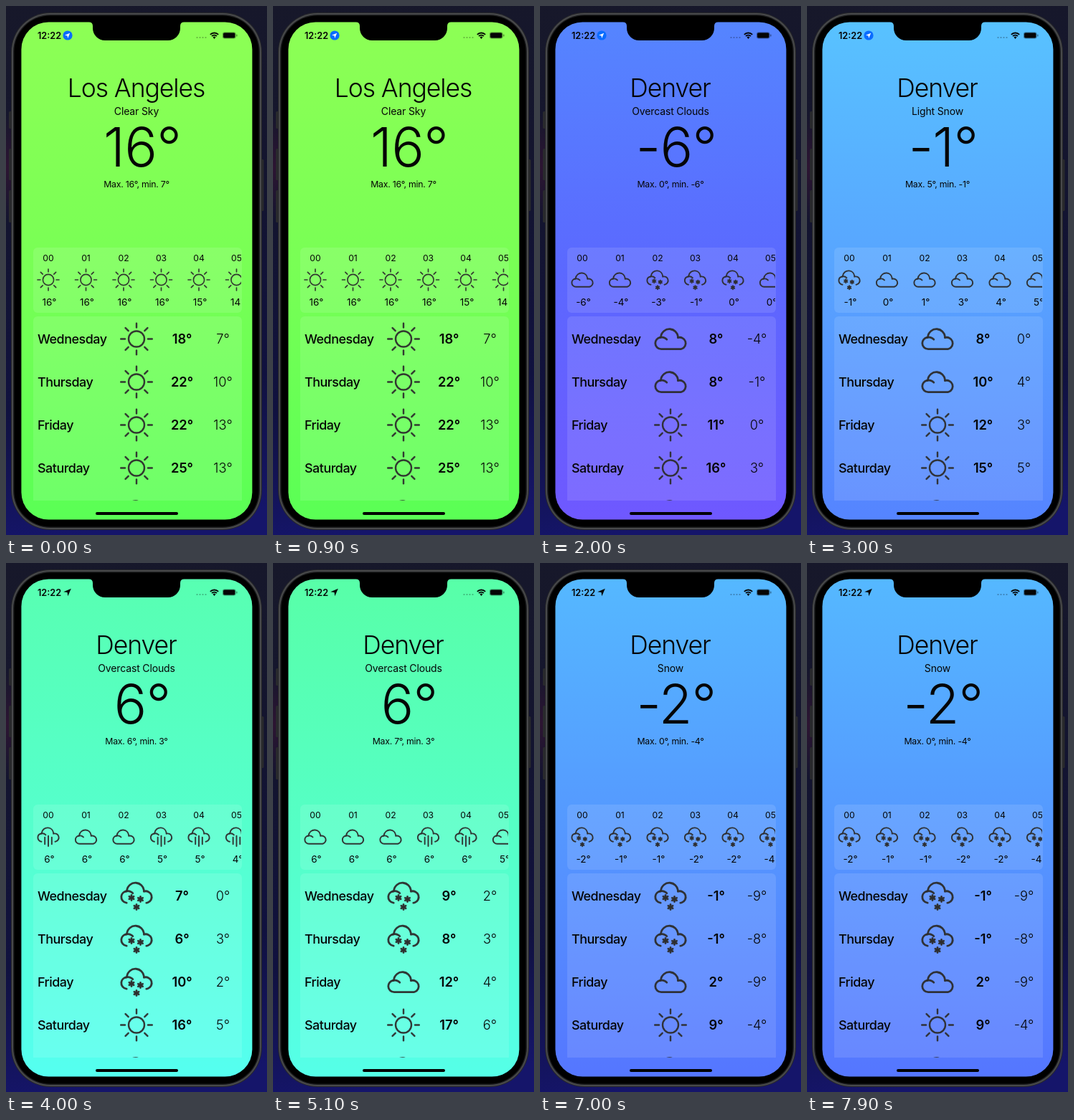
An HTML page with a canvas for the animation above (8000 ms loop, 364x738 px).

```html
<!DOCTYPE html>
<html lang="en">
<head>
<meta charset="utf-8">
<title>Weather</title>
<style>
html, body { margin: 0; width: 100%; height: 100%; overflow: hidden; background: #0d0e20; }
canvas { display: block; width: 364px; height: 738px; }
</style>
</head>
<body>
<canvas id="stage"></canvas>
<script>
const W = 364, H = 738, LOOP = 8000;
const INK = '#050505', ICON = 'rgba(45,45,45,0.95)', CARD = 'rgba(255,255,255,0.11)';
const canvas = document.getElementById('stage');
const ratio = window.devicePixelRatio || 1;
canvas.width = W * ratio;
canvas.height = H * ratio;
const ctx = canvas.getContext('2d');

// Icon letters: s sun, c cloud, r rain, n snow. Days: icon, high, low.
const scenes = [
  { at: 0, city: 'Los Angeles', sky: 'Clear Sky', temp: 16, max: 16, min: 7,
    colors: ['#8dff55', '#78ff55', '#5aff55'], icons: 'ssssss', hours: [16, 16, 16, 16, 15, 14],
    days: [['s', 18, 7], ['s', 22, 10], ['s', 22, 13], ['s', 25, 13]] },
  { at: 1000, city: 'Los Angeles', sky: 'Clear Sky', temp: 12, max: 12, min: 1,
    colors: ['#55ff58', '#55ff75', '#55ff92'], icons: 'ssssss', hours: [12, 11, 11, 10, 9, 8],
    days: [['c', 11, 3], ['s', 14, 6], ['s', 16, 6], ['s', 18, 9]] },
  { at: 2000, city: 'Denver', sky: 'Overcast Clouds', temp: -6, max: 0, min: -6,
    colors: ['#5585ff', '#5b68ff', '#6f58ff'], icons: 'ccnnnc', hours: [-6, -4, -3, -1, 0, 0],
    days: [['c', 8, -4], ['c', 8, -1], ['s', 11, 0], ['s', 16, 3]] },
  { at: 3000, city: 'Denver', sky: 'Light Snow', temp: -1, max: 5, min: -1,
    colors: ['#58c2ff', '#58a4ff', '#5584ff'], icons: 'nccccc', hours: [-1, 0, 1, 3, 4, 5],
    days: [['c', 8, 0], ['c', 10, 4], ['s', 12, 3], ['s', 15, 5]] },
  { at: 4000, city: 'Denver', sky: 'Overcast Clouds', temp: 6, max: 6, min: 3,
    colors: ['#58ffb2', '#55ffcd', '#55fff0'], icons: 'rccrrr', hours: [6, 6, 6, 5, 5, 4],
    days: [['n', 7, 0], ['n', 6, 3], ['n', 10, 2], ['s', 16, 5]], away: true },
  { at: 5000, city: 'Denver', sky: 'Overcast Clouds', temp: 6, max: 7, min: 3,
    colors: ['#58ffa8', '#55ffc6', '#55ffe8'], icons: 'cccrrc', hours: [6, 6, 6, 6, 6, 5],
    days: [['n', 9, 2], ['n', 8, 3], ['c', 12, 4], ['s', 17, 6]], away: true },
  { at: 6900, city: 'Denver', sky: 'Snow', temp: -2, max: 0, min: -4,
    colors: ['#55b8ff', '#5598ff', '#5576ff'], icons: 'nnnnnn', hours: [-2, -1, -1, -2, -2, -4],
    days: [['n', -1, -9], ['n', -1, -8], ['c', 2, -9], ['s', 9, -4]], away: true }
];

function setFont(size, weight, spacing = 0) {
  ctx.font = `${weight} ${size}px Inter, "Liberation Sans", sans-serif`;
  ctx.letterSpacing = `${size * spacing}px`;
}

// y is the middle of the capital letters.
function text(str, x, y, size, weight = 400, spacing = 0, align = 'center') {
  setFont(size, weight, spacing);
  ctx.textAlign = align;
  ctx.fillStyle = INK;
  ctx.fillText(str, x, y + size * 0.364);
}

function box(x, y, w, h, r, fill) {
  ctx.beginPath();
  ctx.roundRect(x, y, w, h, r);
  ctx.fillStyle = fill;
  ctx.fill();
}

function line(x1, y1, x2, y2) {
  ctx.beginPath();
  ctx.moveTo(x1, y1);
  ctx.lineTo(x2, y2);
  ctx.stroke();
}

function arc(x, y, r, from, to) {
  ctx.beginPath();
  ctx.arc(x, y, r, from, to);
  ctx.stroke();
}

function disc(x, y, r, fill) {
  ctx.beginPath();
  ctx.arc(x, y, r, 0, Math.PI * 2);
  ctx.fillStyle = fill;
  ctx.fill();
}

function drawSun() {
  arc(0, 0, 11, 0, Math.PI * 2);
  for (let i = 0; i < 8; i++) {
    const c = Math.cos(i * Math.PI / 4), s = Math.sin(i * Math.PI / 4);
    line(c * 16, s * 16, c * 21.8, s * 21.8);
  }
}

function drawCloud(open) {
  const end = Math.PI / 2 - (open ? 0.1 : 0);
  ctx.beginPath();
  ctx.arc(-13, 6, 8.2, Math.PI - end, Math.PI * 1.45);
  ctx.arc(-1.5, -1.8, 12, Math.PI * 1.03, -0.15);
  ctx.arc(13, 6, 8.2, -1.9, end);
  if (!open) ctx.closePath();
  ctx.stroke();
  arc(-12, 7, 9.3, -Math.PI * 0.6, -0.75);
}

function drawFlake(x, y) {
  for (let i = 0; i < 3; i++) {
    const a = Math.PI / 2 + i * Math.PI / 3;
    const dx = Math.cos(a) * 3.6, dy = Math.sin(a) * 3.6;
    line(x - dx, y - dy, x + dx, y + dy);
  }
}

function drawIcon(kind, x, y, scale) {
  ctx.save();
  ctx.translate(x, y);
  ctx.scale(scale, scale);
  ctx.strokeStyle = ICON;
  ctx.lineWidth = kind === 's' ? 2.4 : 2.8;
  ctx.lineCap = 'round';
  ctx.lineJoin = 'round';
  if (kind === 's') drawSun();
  else if (kind === 'c') drawCloud(false);
  else {
    ctx.translate(0, -4.5);
    drawCloud(true);
    ctx.translate(0, 4.5);
    if (kind === 'n') {
      drawFlake(-7, 2.5);
      drawFlake(5.5, 4.5);
      drawFlake(0, 15.5);
    } else {
      line(-7, 1, -7, 15);
      line(0, -2, 0, 19);
      line(7, 1, 7, 15);
    }
  }
  ctx.restore();
}

function drawBackdrop() {
  const g = ctx.createLinearGradient(0, 0, W * 0.3, H);
  g.addColorStop(0, '#17182a');
  g.addColorStop(0.4, '#13142f');
  g.addColorStop(0.75, '#10113f');
  g.addColorStop(1, '#15156a');
  ctx.fillStyle = g;
  ctx.fillRect(0, 0, W, H);
  const tint = ctx.createRadialGradient(0, 225, 0, 0, 225, 75);
  tint.addColorStop(0, 'rgba(75,20,55,0.45)');
  tint.addColorStop(1, 'rgba(75,20,55,0)');
  ctx.fillStyle = tint;
  ctx.fillRect(0, 140, 20, 170);
}

function drawBody() {
  for (const [y, h] of [[147, 24], [199, 44], [257, 45]]) box(4, y, 5, h, 1.5, '#292a2d');
  box(355, 214, 4.5, 72, 1.5, '#292a2d');
  box(7, 9, 350, 722, 55, '#27282a');
  box(8, 10, 348, 720, 54, '#48494b');
  box(10, 12, 344, 716, 52, '#1d1e1f');
  box(11.5, 13.5, 341, 713, 50, '#000');
}

function drawNotch() {
  ctx.beginPath();
  ctx.moveTo(116, 22);
  ctx.quadraticCurveTo(121, 23, 121, 28);
  ctx.lineTo(121, 31);
  ctx.arcTo(121, 48, 138, 48, 17);
  ctx.lineTo(226, 48);
  ctx.arcTo(243, 48, 243, 31, 17);
  ctx.lineTo(243, 28);
  ctx.quadraticCurveTo(243, 23, 248, 22);
  ctx.fillStyle = '#000';
  ctx.fill();
}

function drawArrow(x, y, r, fill) {
  ctx.beginPath();
  ctx.moveTo(x + r, y - r);
  ctx.lineTo(x + r * 0.15, y + r);
  ctx.lineTo(x, y);
  ctx.lineTo(x - r, y - r * 0.15);
  ctx.closePath();
  ctx.fillStyle = fill;
  ctx.fill();
}

function drawStatus(away) {
  text('12:22', 44, 41, 12.7, 600, 0, 'left');
  if (away) drawArrow(85.5, 41, 5.3, INK);
  else {
    disc(86, 41, 6.6, '#0a6cff');
    drawArrow(85.6, 41.4, 3.6, '#fff');
  }
  for (let i = 0; i < 4; i++) disc(266.5 + i * 4, 44, 1.1, 'rgba(0,0,0,0.3)');
  ctx.strokeStyle = INK;
  ctx.lineWidth = 1.9;
  ctx.lineCap = 'butt';
  for (const r of [4.9, 8]) arc(290.5, 45.5, r, -Math.PI * 0.75, -Math.PI * 0.25);
  ctx.beginPath();
  ctx.moveTo(290.5, 46);
  ctx.arc(290.5, 45.5, 2.8, -Math.PI * 0.75, -Math.PI * 0.25);
  ctx.fillStyle = INK;
  ctx.fill();
  box(302, 36.5, 18.5, 9, 2.7, 'rgba(0,0,0,0.4)');
  box(303.2, 37.6, 16.1, 6.8, 1.7, INK);
  box(321.2, 39.5, 1.3, 3, 0.6, 'rgba(0,0,0,0.45)');
}

function drawHours(scene) {
  box(38, 337, 291, 91, 6, CARD);
  ctx.save();
  ctx.beginPath();
  ctx.rect(38, 337, 290, 91);
  ctx.clip();
  scene.hours.forEach((deg, i) => {
    const x = 59 + i * 52.5;
    text('0' + i, x, 352, 12.2);
    drawIcon(scene.icons[i], x, 382, 0.69);
    text(deg + '°', x + 1.5, 413.5, 13.5);
  });
  ctx.restore();
}

function drawDays(scene) {
  ctx.save();
  ctx.beginPath();
  ctx.rect(38, 433, 291, 257);
  ctx.clip();
  box(38, 433, 291, 280, 6, CARD);
  const names = ['Wednesday', 'Thursday', 'Friday', 'Saturday'];
  scene.days.forEach(([icon, high, low], i) => {
    const y = 464.5 + i * 60;
    text(names[i], 44, y, 17.9, 500, -0.026, 'left');
    drawIcon(icon, 182, y, 1);
    text(high + '°', 245.5, y, 18.3, 600);
    text(low + '°', 302.5, y, 18.3, 300);
  });
  drawIcon('c', 182, 704.5, 1);
  ctx.restore();
}

function drawScreen(scene) {
  const g = ctx.createLinearGradient(0, 23, 0, 716);
  scene.colors.forEach((c, i) => g.addColorStop(i / 2, c));
  box(21.4, 22.4, 322, 694.2, 38, g);
  drawNotch();
  drawStatus(scene.away);
  text(scene.city, 181.5, 114, 35.5, 300, -0.03);
  text(scene.sky, 182, 147, 14, 400, -0.01);
  text(scene.temp + '°', 190, 196, 76, 300, -0.01);
  text(`Max. ${scene.max}°, min. ${scene.min}°`, 182, 248.5, 12.3, 400, -0.02);
  drawHours(scene);
  drawDays(scene);
  box(125, 706, 115, 4, 2, '#000');
}

function render() {
  const t = performance.now() % LOOP;
  const scene = scenes.findLast(s => s.at <= t);
  ctx.setTransform(ratio, 0, 0, ratio, 0, 0);
  drawBackdrop();
  drawBody();
  drawScreen(scene);
  requestAnimationFrame(render);
}
requestAnimationFrame(render);
</script>
</body>
</html>
```
